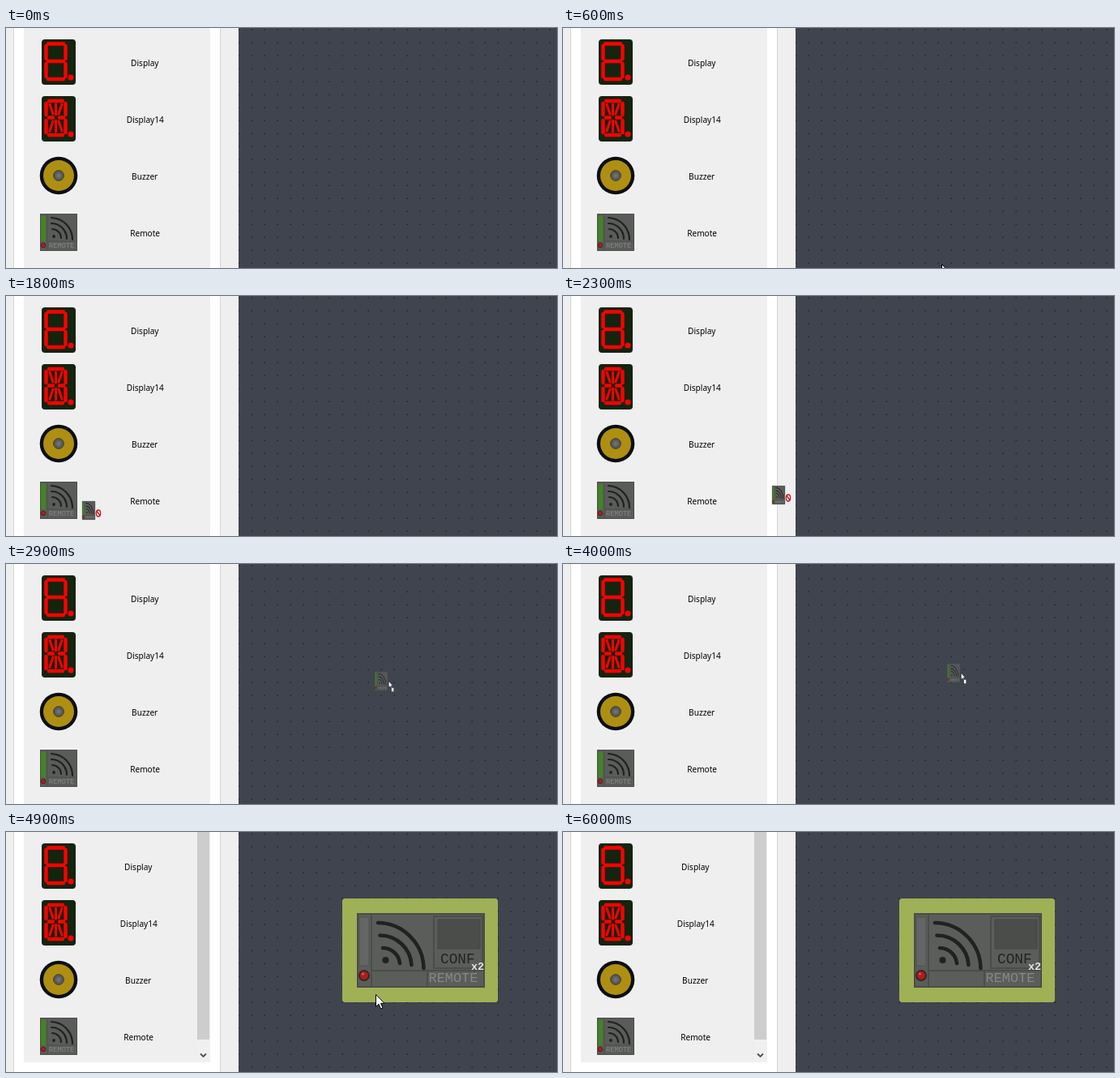
An HTML page for the animation above (6100 ms loop, 680 by 296 pixels).

```html
<!DOCTYPE html>
<html lang="en">
<head>
<meta charset="utf-8">
<style>
  html, body { margin: 0; width: 100%; height: 100%; overflow: hidden; background: #efefef; }
  svg { display: block; width: 680px; height: 296px; }
  .label { font: 10.1px "Noto Sans", sans-serif; text-anchor: middle; }
  .pixel { font-family: "Liberation Mono", monospace; }
  .segments { fill: none; stroke: #fe0000; stroke-width: 4.4; stroke-linecap: round; }
  .arcs { fill: none; stroke: #202120; stroke-linecap: round; }
</style>
</head>
<body>
<svg viewBox="0 0 680 296">
  <defs>
    <pattern id="grid" x="279" y="-6" width="16" height="16" patternUnits="userSpaceOnUse">
      <rect x="7.5" y="7.5" width="1.4" height="1.4" fill="#1d2026"/>
    </pattern>
    <radialGradient id="knob">
      <stop offset="0" stop-color="#77797b"/>
      <stop offset="1" stop-color="#494b4c"/>
    </radialGradient>
    <g id="remote">
      <rect width="46" height="46" fill="#5a5c5a"/>
      <path d="M.5 .5H45.5V45.5H.5ZM9 1V45M9 34H45" fill="none" stroke="#4c4e4c"/>
      <rect x="1.5" y="3" width="5.5" height="31" fill="#40861f"/>
      <circle cx="4" cy="39" r="2.8" fill="#b51b1d" stroke="#4b2425"/>
      <g class="arcs" stroke-width="2.2">
        <path d="M14 5A27 27 0 0 1 40 32M14 12A19 19 0 0 1 33 31M15 19A11 11 0 0 1 26 30"/>
      </g>
      <circle cx="17" cy="28" r="1.9" fill="#202120"/>
      <text class="pixel" x="11" y="41.5" font-size="8.7" fill="#858785">REMOTE</text>
    </g>
    <path id="arrow" d="M.5 .5V15.5L4 12.2 6.5 18 9 17 6.5 11.3H11Z" fill="#fff" stroke="#000"/>
  </defs>

  <rect width="680" height="296" fill="#efefef"/>
  <rect x="9" width="256" height="296" fill="#d4d4d4"/>
  <rect x="10" width="254" height="296" fill="#fff"/>
  <rect id="list" x="22" width="230" height="296" fill="#efefef"/>

  <rect x="44" y="14" width="42" height="56" rx="4" fill="#14240f"/>
  <path class="segments" d="M52 19.5H71M52 41H71M52 63H71M49.5 22V38M49.5 44V60M73.5 22V38M73.5 44V60"/>
  <circle cx="80" cy="61" r="3.6" fill="#fe0000"/>

  <rect x="44" y="84" width="42" height="56" rx="4" fill="#14240f"/>
  <path class="segments" d="M53 90H70M53 110.5H58M66 110.5H71M53 132H70M49.5 93V107M49.5 114V129M73.5 93V107M73.5 114V129"/>
  <path class="segments" style="stroke-width:3" d="M61.5 94V107M61.5 114V128M54 94L58 106M69 94L65 106M58 115L54 127M65 115L69 127"/>
  <circle cx="80" cy="131" r="3.6" fill="#fe0000"/>

  <circle cx="65" cy="182" r="23.3" fill="#0b0e13"/>
  <circle cx="65" cy="182" r="19" fill="#ae8f12"/>
  <circle cx="65" cy="182" r="6.5" fill="url(#knob)" stroke="#3c3b2c" stroke-width=".7"/>

  <use href="#remote" x="42" y="229"/>

  <g id="labels" class="label">
    <text x="171.3" y="47">Display</text>
    <text x="171.8" y="117">Display14</text>
    <text x="171.2" y="187">Buzzer</text>
    <text x="171.6" y="257">Remote</text>
  </g>

  <g id="scrollbar">
    <rect x="236" width="16" height="284" fill="#f0f0f0"/>
    <rect x="236" width="15" height="256" fill="#cdcdcd"/>
    <path d="M240 273.5L243.5 277 247 273.5" fill="none" stroke="#505050" stroke-width="1.8"/>
  </g>

  <rect x="287" width="393" height="296" fill="#3f444f"/>
  <rect x="287" width="393" height="296" fill="url(#grid)"/>

  <g id="module">
    <rect x="415" y="82" width="192" height="128" rx="3.5" fill="#a0b055"/>
    <rect x="433" y="100" width="158" height="92" fill="#5b5d5b"/>
    <path d="M434 101H590V191H434ZM451 102V190M452 171H590M520 171V190M528 104V168H588V104Z" fill="none" stroke="#4b4d4b" stroke-width="2"/>
    <rect x="436" y="105" width="12" height="60" fill="#646665" stroke="#505250"/>
    <rect x="533" y="108" width="52" height="36" fill="#4b4d4b" stroke="#454745"/>
    <circle cx="442" cy="177" r="6" fill="#b01b1d" stroke="#3d2425" stroke-width="2"/>
    <circle cx="440.5" cy="175" r="1.5" fill="#d75a5a"/>
    <g class="arcs" stroke-width="4.6">
      <path d="M459 112A57 57 0 0 1 515.5 168M461.5 127.5A39 39 0 0 1 500.5 164M465 143A21 21 0 0 1 486 162"/>
    </g>
    <circle cx="468.5" cy="158" r="4" fill="#202120"/>
    <text class="pixel" x="536" y="162" font-size="17.8" fill="#222322">CONF</text>
    <text class="pixel" x="521.5" y="184.5" font-size="16.9" fill="#868886">REMOTE</text>
    <text class="pixel" x="574" y="170" font-size="13.5" font-weight="bold" fill="#e4e4e4">x2</text>
  </g>

  <g id="drag">
    <use id="ghost" href="#remote" transform="scale(.348 .5)"/>
    <g id="forbidden" fill="#fff" stroke="#c4181c" stroke-width="1.4">
      <ellipse cx="20" cy="15" rx="2.6" ry="4"/>
      <path d="M18 12L22 18"/>
    </g>
    <g id="allowed">
      <use href="#arrow" transform="translate(17 11) scale(.5 .55)"/>
      <rect x="20.7" y="19.5" width="3" height="5" fill="#fff" stroke="#333" stroke-width=".5"/>
    </g>
  </g>
  <use id="cursor" href="#arrow"/>
</svg>

<script>
const LOOP = 6100, STEP = 100;
const DRAG_START = 1800, DROP = 4400;
const $ = id => document.getElementById(id);

// Keyframes: [time, x, y]
const approach = [[100, 622, 280], [300, 590, 258], [600, 467, 291], [700, 330, 300], [800, 178, 284], [1100, 100, 262], [1300, 82, 257]];
const carry = [[1800, 94, 253], [2000, 130, 252], [2400, 300, 228], [2600, 374, 184], [2900, 455, 133], [3100, 475, 121], [3300, 474, 123]];
const leave = [[4400, 491, 134], [4600, 489, 143], [4900, 456, 200], [5000, 443, 236], [5100, 430, 276], [5200, 424, 300]];

function along(keys, t) {
  const next = keys.findIndex(key => key[0] > t);
  if (next < 0) return keys.at(-1).slice(1);
  if (next === 0) return keys[0].slice(1);
  const [t0, x0, y0] = keys[next - 1], [t1, x1, y1] = keys[next];
  const p = (t - t0) / (t1 - t0);
  return [Math.round(x0 + (x1 - x0) * p), Math.round(y0 + (y1 - y0) * p)];
}

const show = (id, visible) => $(id).setAttribute('display', visible ? 'inline' : 'none');
const place = (id, [x, y]) => $(id).setAttribute('transform', `translate(${x} ${y})`);

function draw(now) {
  const t = Math.floor(now % LOOP / STEP) * STEP;
  const dragging = t >= DRAG_START && t < DROP;
  const dropped = t >= DROP;

  show('cursor', t >= 100 && !dragging && t < 5200);
  place('cursor', along(dropped ? leave : approach, t));

  const ghost = along(carry, t);
  const overCanvas = ghost[0] + 17 >= 287;
  show('drag', dragging);
  place('drag', ghost);
  show('forbidden', !overCanvas);
  show('allowed', overCanvas);
  $('ghost').setAttribute('opacity', overCanvas ? .8 : 1);

  show('module', dropped);
  show('scrollbar', dropped);
  $('list').setAttribute('height', dropped ? 284 : 296);
  place('labels', [dropped ? -8 : 0, 0]);
  requestAnimationFrame(draw);
}
requestAnimationFrame(draw);
</script>
</body>
</html>
```
